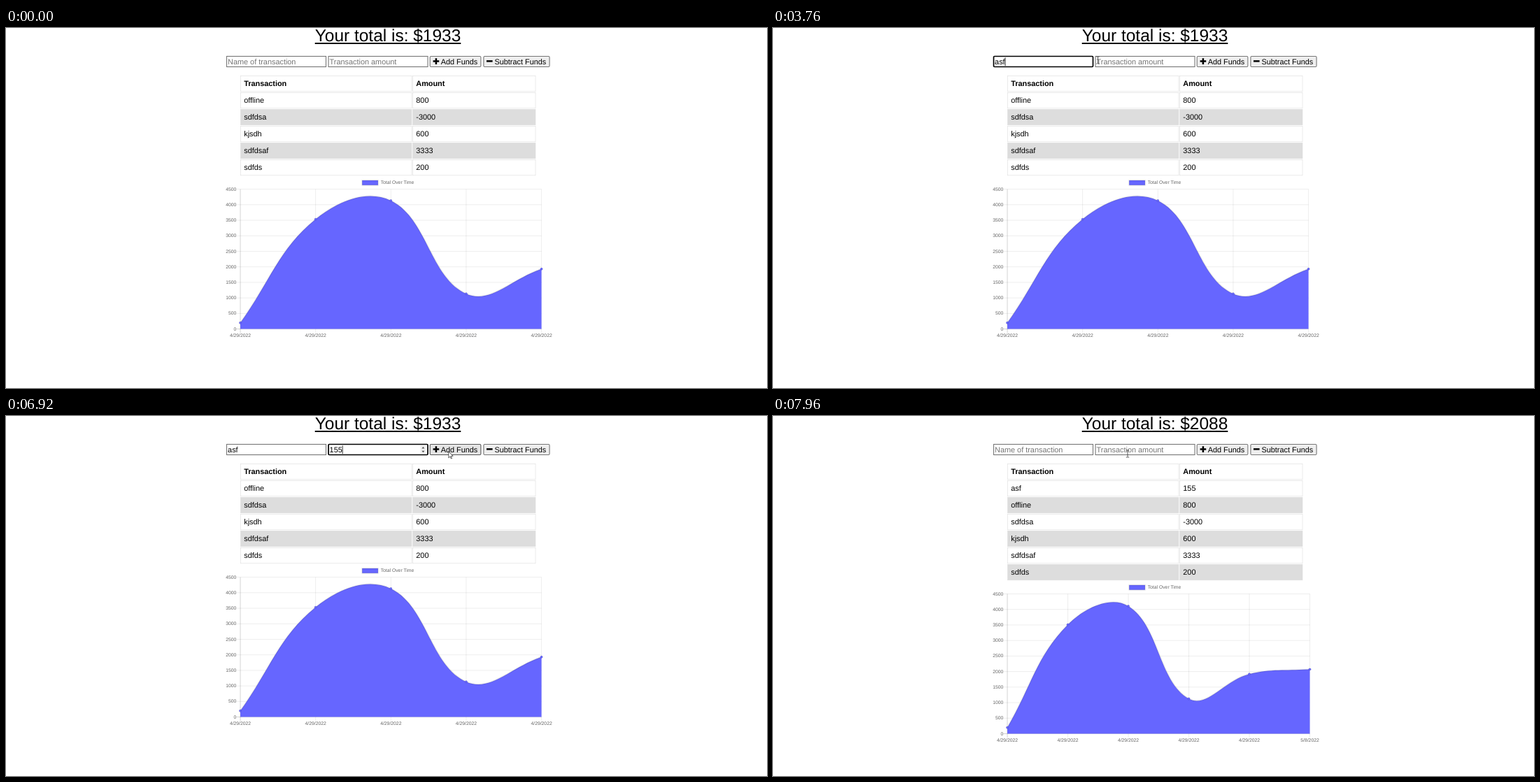
An HTML page for the animation above (8000 ms loop, 1088x515 px).

```html
<!DOCTYPE html>
<html lang="en">
<head>
<meta charset="utf-8">
<title>Budget tracker</title>
<style>
  html, body { margin: 0; width: 100%; height: 100%; overflow: hidden; background: #fff; }
  body { position: relative; font-family: "Liberation Sans", Arial, sans-serif; text-rendering: geometricPrecision; }
  h1 {
    position: absolute; left: 346px; top: -2.4px; width: 400px; margin: 0;
    font-size: 24.48px; font-weight: 400; line-height: 28px; text-align: center;
    text-decoration: underline;
  }
  svg { position: absolute; left: 0; top: 0; font-size: 10.88px; }
  .head { font-weight: 700; }
  .hint { fill: #757575; }
  .small { font-size: 6.8px; fill: #666; }
  .end { text-anchor: end; }
  .mid { text-anchor: middle; }
</style>
</head>
<body>
<h1 id="total"></h1>
<svg width="1088" height="515" viewBox="0 0 1088 515">
  <g id="table"></g>
  <g id="chart"></g>
  <g id="form"></g>
  <g id="pointer"></g>
</svg>
<script>
const LOOP = 8000, STEP = 70, POSTED = 7120, BLINK = 530;
const BLUE = '#6666ff';
const ROWS = [['offline', 800], ['sdfdsa', -3000], ['kjsdh', 600], ['sdfdsaf', 3333], ['sdfds', 200]];
const NEW_ROW = ['asf', 155];

// Pointer moves in bursts: [start, number of steps]
const BURSTS = [[590, 6], [1210, 9], [1970, 10], [2800, 8], [3480, 12], [6490, 22]];
// Pointer path: time, x, y
const PATH = [
  [590, 1060, 488], [660, 975, 375], [800, 842, 185], [940, 802, 133],
  [1140, 802, 133], [1350, 705.5, 58], [1490, 671, 38], [1560, 660, 33], [1770, 645, 49],
  [1900, 645, 49], [2110, 618, 60], [2320, 560, 57], [2600, 480, 50],
  [2730, 480, 50], [3010, 430, 51], [3280, 400, 51],
  [3410, 400, 51], [3620, 432, 47], [3760, 464.5, 46], [3970, 508, 43], [4240, 536, 48],
  [6420, 536, 48], [6630, 580, 50], [6840, 628, 51], [7120, 646, 49],
  [7400, 641, 53], [7680, 592, 57], [7960, 507, 54]
];
// Typing: time, text
const NAME_KEYS = [[0, ''], [3480, 'a'], [3620, 'as'], [3690, 'asf'], [7190, '']];
const AMOUNT_KEYS = [[0, ''], [5510, '1'], [5710, '15'], [5840, '155'], [7190, '']];

const NAME_BOX = { x: 315.5, w: 142 };
const AMOUNT_BOX = { x: 461, w: 142 };
const ADD_BOX = { x: 606.2, w: 72.7 };
const SUB_BOX = { x: 682.9, w: 94.2 };

const byId = id => document.getElementById(id);
const lerp = (a, b, k) => a + (b - a) * k;
const clamp = (v, lo, hi) => Math.min(hi, Math.max(lo, v));
const latest = (keys, t) => keys.filter(k => k[0] <= t).pop();

const text = (x, y, str, cls = '') => `<text x="${x}" y="${y}" class="${cls}">${str}</text>`;
const rect = (x, y, w, h, attrs) => `<rect x="${x}" y="${y}" width="${w}" height="${h}" ${attrs}/>`;
const path = (d, attrs) => `<path d="${d}" ${attrs}/>`;

const drawn = {};
function put(id, html) {
  if (drawn[id] === html) return;
  drawn[id] = html;
  byId(id).innerHTML = html;
}

function tableHtml(rows) {
  return [['Transaction', 'Amount'], ...rows].map((row, i) => {
    const y = 68.4 + 24 * i;
    const fill = i && i % 2 === 0 ? '#ddd' : '#fff';
    const cell = `fill="${fill}" stroke="#ddd" stroke-width=".6"`;
    const cls = i ? '' : 'head';
    return rect(335.4, y, 244.6, 22.4, cell) + rect(581.6, y, 175.4, 22.4, cell) +
      text(340.2, y + 14.9, row[0], cls) + text(586.3, y + 14.9, row[1], cls);
  }).join('');
}

// Smooth curve through the points, handles kept inside the plot
function curve(pts, top, base, grow) {
  const handles = pts.map((p, i) => {
    const a = pts[i - 1] || p, b = pts[i + 1] || p;
    const da = Math.hypot(p.x - a.x, p.y - a.y), db = Math.hypot(b.x - p.x, b.y - p.y);
    const handle = k => ({
      x: clamp(p.x + k * (b.x - a.x), pts[0].x, pts[pts.length - 1].x),
      y: clamp(p.y + k * (b.y - a.y), top, base)
    });
    return { before: handle(-0.4 * da / (da + db)), after: handle(0.4 * db / (da + db)) };
  });
  const at = p => `${p.x.toFixed(2)} ${lerp(base, p.y, grow).toFixed(2)}`;
  return pts.map((p, i) => i
    ? `C${at(handles[i - 1].after)} ${at(handles[i].before)} ${at(p)}`
    : `M${at(p)}`).join('');
}

function chartHtml(rows, posted, grow) {
  const left = 335, right = posted ? 767.5 : 765.6;
  const top = posted ? 254.5 : 230.6, base = top + 200;
  let sum = 0;
  const pts = [...rows].reverse().map((row, i) => {
    sum += row[1];
    return { x: lerp(left, right, i / (rows.length - 1)), y: base - sum / 4500 * 200 };
  });

  let html = rect(509.2, top - 12.6, 22.7, 6.8, `fill="${BLUE}" stroke="#000" stroke-opacity=".1" stroke-width="1.7"`) +
    text(535.7, top - 7.2, 'Total Over Time', 'small');
  const grid = (d, strong) => path(d, `stroke="#000" stroke-opacity="${strong ? 0.25 : 0.1}" stroke-width=".7"`);
  for (let v = 0; v <= 4500; v += 500) {
    const y = base - v / 4500 * 200;
    html += grid(`M${left - 5.7} ${y}H${right}`, v === 0) + text(329.4, y + 2.1, v, 'small end');
  }
  pts.forEach((p, i) => {
    html += grid(`M${p.x} ${top}V${base + 5.7}`, i === 0) +
      text(p.x, base + 11.8, i === 5 ? '5/8/2022' : '4/29/2022', 'small mid');
  });

  const line = curve(pts, top, base, grow);
  html += path(`${line}V${base}H${left}Z`, `fill="${BLUE}"`) +
    path(line, 'fill="none" stroke="#000" stroke-opacity=".1" stroke-width="1.7"');
  for (const p of pts) {
    html += `<circle cx="${p.x}" cy="${lerp(base, p.y, grow)}" r="1.7" fill="${BLUE}" stroke="#000" stroke-opacity=".14" stroke-width=".7"/>`;
  }
  return html;
}

const textWidth = str => [...str].reduce((w, c) => w + (c === 's' ? 0.5 : c === 'f' ? 0.278 : 0.556) * 10.88, 0);

function inputHtml(box, value, hint, focused, caret) {
  const x = box.x + 1.6;
  const line = focused
    ? 'rx="1.2" fill="#fff" stroke="#000" stroke-width="1.7"'
    : 'fill="#fff" stroke="#767676" stroke-width="1.1"';
  return rect(box.x, 40.5, box.w, 15, line) +
    text(x, 51.6, value || hint, value ? '' : 'hint') +
    (caret ? rect(x + textWidth(value), 42.4, 0.8, 11.8, '') : '');
}

const buttonHtml = (box, label, hot, icon, gap) =>
  rect(box.x, 40.5, box.w, 15, `rx="1.4" fill="${hot ? '#e5e5e5' : '#efefef'}" stroke="${hot ? '#555' : '#767676'}" stroke-width="1.1"`) +
  path(icon, 'stroke="#000" stroke-width="2.5"') + text(box.x + gap, 51.6, label);

const inside = (box, p) => p && p.x >= box.x && p.x <= box.x + box.w && p.y >= 40 && p.y <= 56;

function formHtml(t, pos) {
  const name = latest(NAME_KEYS, t)[1], amount = latest(AMOUNT_KEYS, t)[1];
  const onName = t >= 3210 && t < 4380, onAmount = t >= 4380 && t < 7050;
  const lastKey = onName ? Math.max(3210, latest(NAME_KEYS, t)[0]) : Math.max(4380, latest(AMOUNT_KEYS, t)[0]);
  const lit = Math.floor((t - lastKey) / BLINK) % 2 === 0;
  const spin = onAmount || (t >= 3830 && t < 4380) || (t >= 2390 && t < 2870);
  return inputHtml(NAME_BOX, name, 'Name of transaction', onName, onName && lit) +
    inputHtml(AMOUNT_BOX, amount, 'Transaction amount', onAmount, onAmount && lit) +
    (spin ? rect(592.4, 42.3, 8, 11.4, 'fill="#efefef"') +
      path('M594.4 46.4L596.4 43.9L598.4 46.4ZM594.4 49.7L596.4 52.2L598.4 49.7Z', 'fill="#505050"') : '') +
    buttonHtml(ADD_BOX, 'Add Funds', inside(ADD_BOX, pos), 'M610.6 47.6H619.2M614.9 43.3V51.9', 15.5) +
    buttonHtml(SUB_BOX, 'Subtract Funds', inside(SUB_BOX, pos), 'M687 47.4H695.6', 15.6);
}

function pointerAt(t) {
  if (t < PATH[0][0]) return null;
  const [start, count] = latest(BURSTS, t);
  const s = start + STEP * Math.min(count - 1, Math.floor((t - start) / STEP));
  const i = PATH.findIndex(k => k[0] > s);
  const b = i < 0 ? PATH[PATH.length - 1] : PATH[i];
  const a = i < 0 ? b : PATH[i - 1];
  const k = a === b ? 0 : (s - a[0]) / (b[0] - a[0]);
  return { x: lerp(a[1], b[1], k), y: lerp(a[2], b[2], k) };
}

function pointerHtml(p) {
  if (!p) return '';
  const beam = inside(NAME_BOX, p) || inside(AMOUNT_BOX, p);
  const shape = beam
    ? path('M-2.2 -5H-.6L0 -4.5L.6 -5H2.2M0 -4.5V4.5M-2.2 5H-.6L0 4.5L.6 5H2.2', 'fill="none" stroke="#333" stroke-width=".8"')
    : path('M.5 .5V16.5L4.3 13L6.8 18.6L9 17.7L6.6 12.2H11.7Z', 'transform="scale(.567)" fill="#fff" stroke="#000" stroke-width="1.1"');
  return `<g transform="translate(${p.x} ${p.y})">${shape}</g>`;
}

function growth(t) {
  if (t < POSTED) return 1;
  const s = Math.floor((t - POSTED) / STEP) * STEP;
  return 1 - (1 - (0.016 + s * 0.000829)) ** 4;
}

function render(t) {
  const posted = t >= POSTED;
  const rows = posted ? [NEW_ROW, ...ROWS] : ROWS;
  const pos = pointerAt(t);
  put('total', 'Your total is: $' + rows.reduce((sum, row) => sum + row[1], 0));
  put('table', tableHtml(rows));
  put('chart', chartHtml(rows, posted, growth(t)));
  put('form', formHtml(t, pos));
  put('pointer', pointerHtml(pos));
}

const began = performance.now();
function tick() {
  render((performance.now() - began) % LOOP);
  requestAnimationFrame(tick);
}
tick();
</script>
</body>
</html>
```
